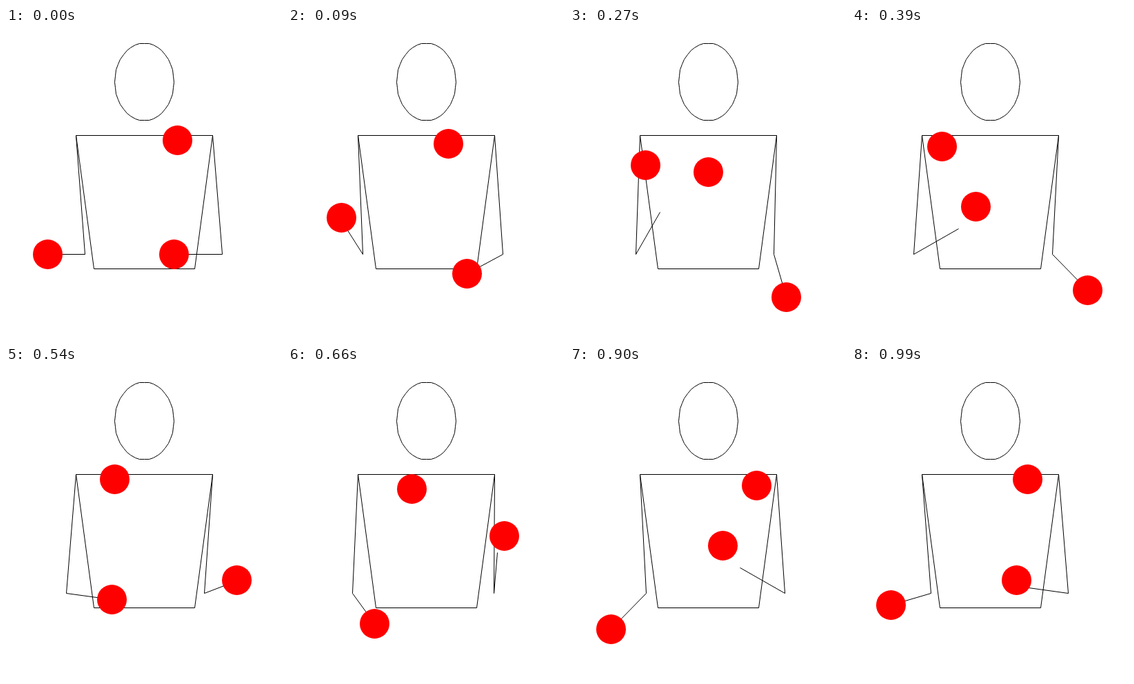
Write an HTML page that moves like this. It is 400 by 450 pixels and loops after 1.02 s.

```html
<!DOCTYPE html>
<html lang="en">
<head>
<meta charset="utf-8">
<title>Three-ball cascade</title>
<style>
  html, body { margin: 0; width: 100%; height: 100%; overflow: hidden; background: #fff; }
  svg { display: block; width: 400px; height: 450px; }
  .line { fill: none; stroke: #000; stroke-width: 1; }
  circle { fill: #f00; }
</style>
</head>
<body>
<svg viewBox="0 0 400 450">
  <g transform="translate(.5 .5)">
    <polygon class="line" id="head"/>
    <polygon class="line" points="101,155 299,155 273,348 127,348"/>
    <polyline class="line arm"/>
    <polyline class="line arm"/>
    <circle r="21.5"/>
    <circle r="21.5"/>
    <circle r="21.5"/>
  </g>
</svg>
<script>
const STEP = 30, HALF = 17, LOOP = 2 * HALF;
const G = 0.57, APEX = 161.9;
const VX = 5.37, VY = 2 * G * HALF;
const THROW = { x: 339.6, y: APEX + G * HALF * HALF };
const CATCH = { x: 400 - THROW.x + VX * LOOP, y: THROW.y };
const SHOULDER = { x: 299, y: 155 }, ELBOW_Y = 327;

const arms = document.querySelectorAll('.arm');
const balls = document.querySelectorAll('circle');

const mirror = p => ({ x: 400 - p.x, y: p.y });
const same = p => p;

// Joints snap to whole pixels.
function setPoints(shape, points) {
  shape.setAttribute('points',
    points.map(p => `${Math.round(p.x)},${Math.round(p.y)}`).join(' '));
}

function place(ball, p) {
  ball.setAttribute('cx', Math.round(p.x));
  ball.setAttribute('cy', Math.round(p.y));
}

// The head is a 40-sided ellipse.
setPoints(document.getElementById('head'), Array.from({ length: 40 }, (_, i) => {
  const a = i * Math.PI / 20;
  return { x: 200 + 43 * Math.cos(a), y: 77.55 + 55.9 * Math.sin(a) };
}));

// Cubic from a to b over one half cycle, with end speeds va and vb.
function hermite(a, b, va, vb, s) {
  const d = b - a, p = va * HALF, q = vb * HALF;
  return a + s * (p + s * (3 * d - 2 * p - q + s * (p + q - 2 * d)));
}

// Right hand: scoops from catch to throw, then returns empty.
function handAt(m) {
  const carry = m < HALF;
  const s = (carry ? m : m - HALF) / HALF;
  const caught = [CATCH.x, CATCH.y, VX / 2, VY / 2];
  const thrown = [THROW.x, THROW.y, -VX, -VY];
  const [a, b] = carry ? [caught, thrown] : [thrown, caught];
  return {
    x: hermite(a[0], b[0], a[2], b[2], s),
    y: hermite(a[1], b[1], a[3], b[3], s)
  };
}

// The elbow swings opposite to the hand, less so when the hand is high or low.
function elbowAt(hand) {
  const dx = hand.x - SHOULDER.x;
  const swing = 15.4 * (1 - 0.00012 * (hand.y - THROW.y) ** 2);
  return { x: SHOULDER.x - swing * dx / Math.hypot(dx, 26), y: ELBOW_Y };
}

// Ball thrown by the right hand, n steps into its flight.
function flightAt(n) {
  return { x: THROW.x - VX * n, y: APEX + G * (n - HALF) ** 2 };
}

function draw(ms) {
  const t = Math.floor(ms / STEP) % LOOP;
  [same, mirror].forEach((flip, i) => {
    const m = (t + i * HALF) % LOOP;
    const hand = handAt(m);
    setPoints(arms[i], [SHOULDER, elbowAt(hand), hand].map(flip));
    place(balls[i], flip(flightAt((m + HALF) % LOOP)));
    if (m < HALF) place(balls[2], flip(hand));
  });
}

const start = performance.now();
function tick() {
  draw(performance.now() - start);
  requestAnimationFrame(tick);
}
tick();
</script>
</body>
</html>
```
